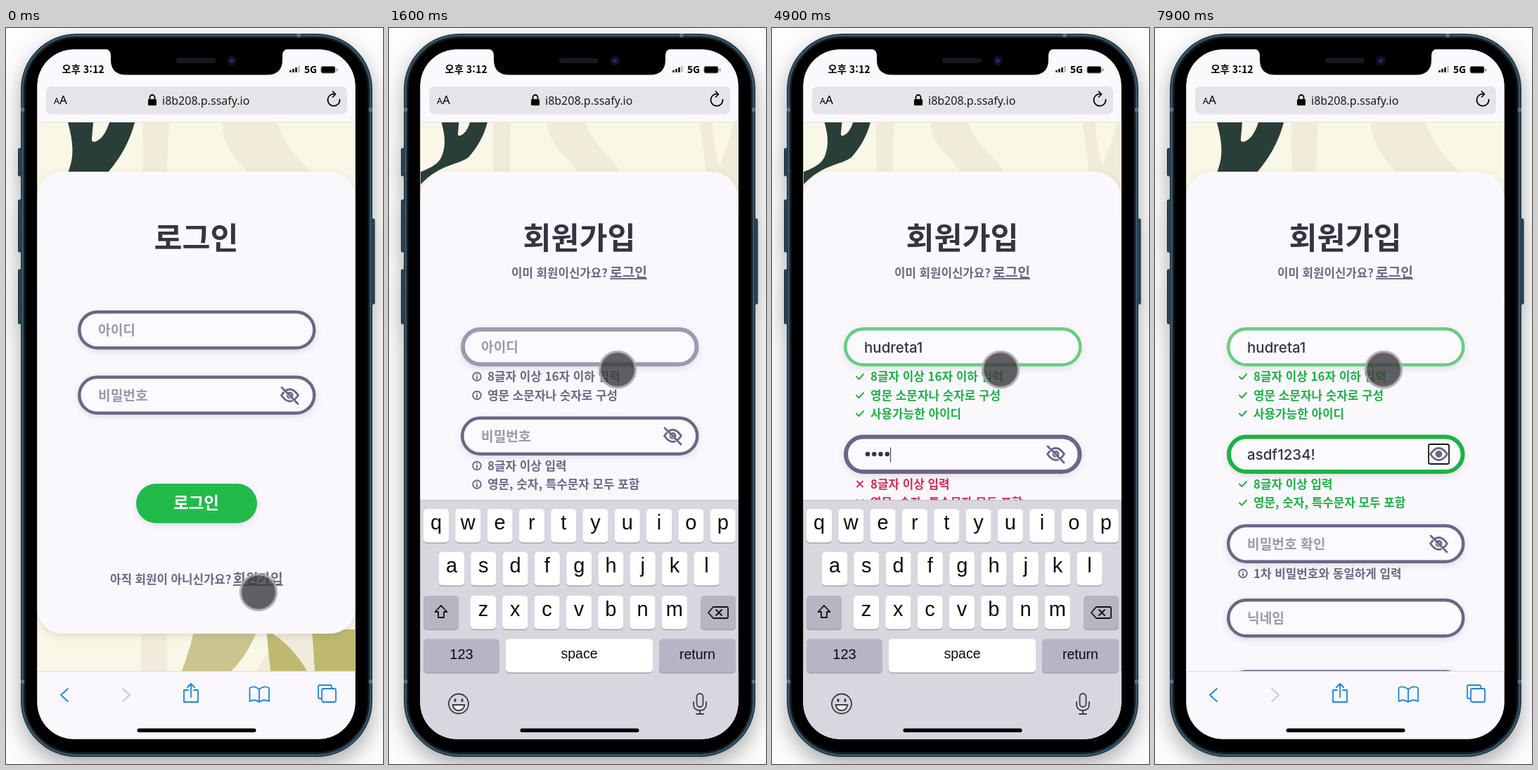
An HTML page for the animation above (8 s loop, 536 by 1045 pixels).

```html
<!DOCTYPE html>
<html lang="ko">
<head>
<meta charset="utf-8">
<style>
html, body { margin: 0; width: 100%; height: 100%; overflow: hidden; background: #fdfdfd; }
svg { display: block; width: 536px; height: 1045px; }
text { font-family: "Noto Sans CJK KR", "Noto Sans CJK", "Noto Sans", sans-serif; white-space: pre; }
.latin { font-family: "Noto Sans", sans-serif; }
.entry { font-family: Inter, "Noto Sans", sans-serif; font-weight: 500; }
.keys text { font-family: "Liberation Sans", Arial, sans-serif; text-anchor: middle; fill: #0b0b0d; }
.line { fill: none; stroke-linecap: round; stroke-linejoin: round; }
.mid { text-anchor: middle; }
</style>
</head>
<body>
<svg viewBox="0 0 536 1045">
  <defs>
    <filter id="phoneShadow" x="-20%" y="-10%" width="140%" height="120%">
      <feDropShadow dx="0" dy="12" stdDeviation="15" flood-color="#000" flood-opacity=".32"/>
    </filter>
    <filter id="soft" x="-20%" y="-30%" width="140%" height="190%">
      <feDropShadow dx="0" dy="3" stdDeviation="5" flood-color="#55506a" flood-opacity=".17"/>
    </filter>
    <clipPath id="screen"><rect x="44.500" y="30.500" width="452" height="979" rx="52"/></clipPath>
    <clipPath id="view"><rect id="viewRect" x="44" y="134" width="453" height="779"/></clipPath>
  </defs>

  <g filter="url(#phoneShadow)">
    <g fill="#2b4353" stroke="#1b2d39">
      <rect x="17.500" y="171" width="8" height="39" rx="1.500"/>
      <rect x="17.500" y="244" width="8" height="74" rx="1.500"/>
      <rect x="17.500" y="343" width="8" height="77" rx="1.500"/>
      <rect x="516" y="271" width="8" height="121" rx="1.500"/>
    </g>
    <rect x="21" y="8" width="500" height="1027" rx="79" fill="#253d4c"/>
  </g>
  <rect x="24" y="11" width="494" height="1021" rx="76" fill="#000" stroke="#3a5669" stroke-width="2.500"/>
  <rect x="26.500" y="13.500" width="489" height="1016" rx="73.500" fill="#000" stroke="#15242e" stroke-width="2"/>
  <path d="M21 116h5M516 116h5M21 928h5M516 928h5M416 8v5" stroke="#5d7484" stroke-width="5"/>

  <g clip-path="url(#screen)">
    <rect x="44" y="30" width="453" height="980" fill="#fbf9fd"/>
    <g clip-path="url(#view)">
      <rect x="44" y="134" width="453" height="780" fill="#f9f7e5"/>
      <g id="scenery">
        <g fill="#f0ebda">
          <path d="M149 0H187Q180 60 184 779H147Q154 300 149 0Z"/>
          <path d="M262 0H340Q350 34 394 76Q440 124 452 250H380Q350 130 305 76Q263 40 262 0Z"/>
          <path d="M576 0H602Q606 60 618 90L640 30L646 0H664V180H596Q588 70 576 0Z"/>
          <path d="M310 779Q340 735 352 700L400 726L450 779Z"/>
        </g>
        <path d="M43 0H138C131 27 118 50 100 71C82 88 42 84 0 128V102C28 91 40 82 45 66C53 44 49 22 43 0Z" fill="#2a3e39"/>
        <path d="M79 0H102Q95 22 83 27Q76 29 77 23Z" fill="#f9f7e5"/>
        <path d="M223 720H313Q296 760 275 779H205Q216 750 223 720Z" fill="#cac58f"/>
        <path d="M325 720Q362 742 383 779H331ZM390 720H453V779H394Z" fill="#bfb970"/>
      </g>
      <g id="form"></g>
    </g>

    <g id="toolbar">
      <rect x="44" width="453" height="440" fill="#faf8fd"/>
      <path d="M44 .5H497" stroke="#dddbe2"/>
      <g class="line" stroke="#1c84e4" stroke-width="1.8">
        <path d="M88 25L78 34L88 43"/>
        <path d="M166 25L176 34L166 43" stroke="#c9c7ce"/>
        <path d="M259 27H253V44H273V27H267M263 37V18M258 23L263 18L268 23"/>
        <path d="M360 26Q353 20 346.500 24V43Q354 39 360 44Q366 39 374 43V24Q367 20 360 26V43"/>
        <path d="M448 39H446Q444 39 444 37V22Q444 20 446 20H461Q463 20 463 22V24"/>
        <rect x="449" y="25" width="20" height="19" rx="2.500"/>
      </g>
    </g>
    <g id="keyboard" class="keys"></g>

    <rect x="44" y="30" width="453" height="104" fill="#fbf9fd"/>
    <path d="M44 133.500H497" stroke="#e6e4e9"/>
    <rect x="57" y="83" width="428" height="39.500" rx="8" fill="#e6e4e8"/>
    <text x="79.500" y="64" font-size="14.300" font-weight="700">오후 3:12</text>
    <text class="latin" x="424" y="64" font-size="14" font-weight="700">5G</text>
    <path d="M404.500 63v-3M408.500 63v-5M412.500 63v-7" stroke="#111" stroke-width="2.600"/>
    <path d="M416.500 63v-9" stroke="#bbb" stroke-width="2.600"/>
    <rect x="448" y="54.500" width="20" height="9.500" rx="2.500" stroke="#777"/>
    <path d="M470.500 57.500v4" stroke="#777" stroke-width="1.500"/>
    <text class="latin" x="68" y="108" font-size="12.500">A<tspan font-size="17">A</tspan></text>
    <rect x="202" y="101" width="12" height="9" rx="1.500"/>
    <path class="line" d="M204.500 101V98.500a3.500 3.500 0 0 1 7 0V101" stroke="#000" stroke-width="1.800"/>
    <text class="latin" x="222" y="108.500" font-size="16" fill="#1c1c1f">i8b208.p.ssafy.io</text>
    <path class="line" d="M474.500 101.500a8.500 8.500 0 1 1 -6 -7.500M464.500 90L468.500 94L464.500 98" stroke="#000" stroke-width="1.700"/>
    <rect x="186.500" y="994.500" width="169" height="5.500" rx="2.750"/>
  </g>

  <path d="M141 29.500Q149 30.500 149 39V45Q149 66.500 171 66.500H371Q393 66.500 393 45V39Q393 30.500 401 29.500Z"/>
  <rect x="242" y="42.500" width="56" height="7.500" rx="3.750" fill="#17181b"/>
  <circle cx="321" cy="46.500" r="7" fill="#0d1122"/>
  <circle cx="321" cy="46.500" r="3" fill="#1d2c66"/>

  <g id="touch">
    <circle r="25" fill="#3a393c" fill-opacity=".8"/>
    <circle r="25.500" fill="none" stroke="#a9a7ab" stroke-opacity=".8" stroke-width="3.500"/>
  </g>
</svg>
<script>
const LOOP = 8000, STEP = 100;
const USER = 'hudreta1', PASS = 'asdf1234!';
const USER_KEYS = [2000, 2250, 2500, 2750, 2900, 3050, 3200, 3400];
const PASS_KEYS = [4350, 4500, 4650, 4800, 5000, 5150, 5300, 5500, 6300];
const T = { signup: 250, move: 350, focusId: 750, open: 768, focusPw: 3700, close: 6800, reveal: 7400 };
const KB_TOP = 670, KB_OUT = 1010, BAR = 97, VIEW_TOP = 134, VIEW_END = 913;
const INK = '#353441', PURPLE = '#6c6686', GREEN = '#1bb244', RED = '#d92b50', HINT = '#9c99a9';

const $ = id => document.getElementById(id);
const clamp = v => Math.max(0, Math.min(1, v));
const easeOut = p => 1 - (1 - clamp(p)) ** 3;
const easeInOut = p => (p = clamp(p)) * p * (3 - 2 * p);
const typed = (keys, t) => keys.filter(k => k <= t).length;
const pen = document.createElement('canvas').getContext('2d');
pen.font = '500 20.5px Inter, "Noto Sans", sans-serif';

const text = (x, y, size, fill, str, extra = 'font-weight="600"') =>
  `<text x="${x}" y="${y}" font-size="${size}" fill="${fill}" ${extra}>${str}</text>`;
const MID = 'class="mid" font-weight="700"';
const LINK = 'font-weight="600" text-decoration="underline"';

function eye(y, open, focus) {
  const box = focus ? `<rect x="389" y="${y - 14}" width="29" height="28" rx="2.5" fill="none" stroke="#17171c" stroke-width="1.8"/>` : '';
  const slash = open ? '' :
    `<path d="M393 -9L415 13" stroke="#fcfafe" stroke-width="3"/><path d="M392 -11L415 12"/>`;
  return `${box}<g class="line" transform="translate(0 ${y})" stroke="${PURPLE}" stroke-width="2.9">
    <path d="M391.500 0Q403.500 -17 415.500 0Q403.500 17 391.500 0Z"/>
    <circle cx="403.500" r="3.500" fill="${open ? PURPLE : 'none'}"/>${slash}</g>`;
}

// Pill-shaped field whose outer top edge is y
function field(y, { color = PURPLE, width = 4.5, hint = '', body = '' }) {
  const i = width / 2;
  return `<rect x="${102 + i}" y="${y + i}" width="${338.5 - width}" height="${55.5 - width}" rx="${27.75 - i}"
    fill="#fcfafe" stroke="${color}" stroke-width="${width}" filter="url(#soft)"/>` +
    (hint && text(131, y + 35, 19.2, HINT, hint)) + body;
}

const MARKS = {
  info: '<circle cx="125" r="5.8"/><path d="M125 0V3M125 -2.800V-2.700"/>',
  ok: '<path d="M120 0L123.500 3.500L130 -3.500"/>',
  bad: '<path d="M121 -4L129 4M129 -4L121 4"/>'
};
function rule(y, state, str) {
  const c = { info: PURPLE, ok: GREEN, bad: RED }[state];
  return `<g class="line" transform="translate(0 ${y})" stroke="${c}" stroke-width="1.9">${MARKS[state]}</g>` +
    text(140, y + 6, 16.9, c, str);
}

const card = (h, r) => `<rect x="44.500" y="204" width="452" height="${h}" rx="${r}" fill="#fbf8fd" filter="url(#soft)"/>`;
const entry = (y, str) => text(131, y + 35.5, 20.5, INK, str, 'class="entry"');
const caret = (x, y) => `<path d="M${x} ${y + 18}V${y + 39}" stroke="#55535f" stroke-width="1.3"/>`;
const blink = (t, since) => (t - since) % 1000 < 500;

function login() {
  return card(656, 36) + text(270.5, 314, 43.5, INK, '로그인', MID) +
    field(401, { hint: '아이디' }) +
    field(493.5, { hint: '비밀번호', body: eye(521.5) }) +
    `<rect x="185" y="647" width="172" height="56" rx="28" fill="#20bb4c" filter="url(#soft)"/>` +
    text(270.5, 683, 23.5, '#fff', '로그인', MID) +
    text(148, 789, 16.8, PURPLE, '아직 회원이 아니신가요?') +
    text(323, 789, 19.2, PURPLE, '회원가입', LINK);
}

function mixGreen(p) {
  const from = [156, 153, 177], to = [102, 205, 130];
  return `rgb(${from.map((v, i) => Math.round(v + (to[i] - v) * p))})`;
}

function signup(t) {
  const n = typed(USER_KEYS, t), m = typed(PASS_KEYS, t);
  const onId = t >= T.focusId && t < T.focusPw, onPw = t >= T.focusPw;
  const left = t >= T.close, shown = t >= T.reveal;
  const pwY = onPw ? 577.5 : 551.5;
  const name = USER.slice(0, n);
  const check = (good, count) => !count ? 'info' : good ? 'ok' : 'bad';

  let idBody = n ? entry(425, name) : '';
  if (onId && blink(t, n ? USER_KEYS[n - 1] : T.focusId))
    idBody += caret(131.5 + pen.measureText(name).width, 425);

  let pwBody = eye(pwY + 27.5, shown, left);
  if (shown) pwBody += entry(pwY, PASS);
  else for (let i = 0; i < m; i++)
    pwBody += `<circle cx="${136 + i * 9.25}" cy="${pwY + 27.5}" r="3.2" fill="${INK}"/>`;
  if (onPw && !left && blink(t, m ? PASS_KEYS[m - 1] : T.focusPw))
    pwBody += caret(131.5 + m * 9.25, pwY);

  return card(900, 38) + text(270.5, 314, 43.5, INK, '회원가입', MID) +
    text(174, 354, 16.8, PURPLE, '이미 회원이신가요?') +
    text(314, 354, 19.2, PURPLE, '로그인', LINK) +
    field(425, {
      color: t < T.focusId ? PURPLE : mixGreen(clamp((t - T.focusPw) / 250)),
      width: onId ? 6 : 4.5, hint: n ? '' : '아이디', body: idBody
    }) +
    rule(495, check(n > 7, n), '8글자 이상 16자 이하 입력') +
    rule(521.5, check(true, n), '영문 소문자나 숫자로 구성') +
    (onPw ? rule(547.5, 'ok', '사용가능한 아이디') : '') +
    field(pwY, {
      color: m > 8 ? GREEN : PURPLE, width: onPw ? 6 : 4.5,
      hint: m ? '' : '비밀번호', body: pwBody
    }) +
    rule(pwY + 70, check(m > 7, m), '8글자 이상 입력') +
    rule(pwY + 96.5, check(m > 8, m), '영문, 숫자, 특수문자 모두 포함') +
    field(pwY + 127, { hint: '비밀번호 확인', body: eye(pwY + 154.5) }) +
    rule(pwY + 197, 'info', '1차 비밀번호와 동일하게 입력') +
    field(pwY + 232.5, { hint: '닉네임' }) +
    field(pwY + 334, {});
}

function key(x, y, w, label, size, base, gray) {
  return `<rect x="${x}" y="${y + 1.5}" width="${w}" height="47.5" rx="5" fill="#a4a1ae"/>
    <rect x="${x}" y="${y}" width="${w}" height="47.5" rx="5" fill="${gray ? '#b7b4c3' : '#fff'}"/>` +
    `<text x="${x + w / 2}" y="${y + base}" font-size="${size}">${label}</text>`;
}

function buildKeyboard() {
  const rows = [['qwertyuiop', 49, 13], ['asdfghjkl', 71, 74], ['zxcvbnm', 116, 136]];
  let s = '<rect x="44" width="453" height="440" fill="#d9d6e0"/><path d="M44 .5H497" stroke="#c3c0cb"/>';
  for (const [letters, x, y] of rows)
    [...letters].forEach((c, i) => s += key(x + i * 45.3, y, 36, c, 29, 28.5, false));
  s += key(49, 136, 50, '', 20, 30, true) + key(443, 136, 50, '', 20, 30, true) +
    key(49, 197.5, 108, '123', 20, 28.5, true) + key(166, 197.5, 209, 'space', 19.5, 27, false) +
    key(384, 197.5, 109, 'return', 19.5, 28, true);
  s += `<g class="line" stroke="#111" stroke-width="1.8">
    <path d="M74 150L82.500 159H78V167H70V159H65.500Z"/>
    <path d="M461 152H480Q482 152 482 154V166Q482 168 480 168H461L454 160ZM465 156L473 164M473 156L465 164"/></g>
    <g class="line" stroke="#3c3b43" stroke-width="1.8">
    <circle cx="99" cy="289.500" r="14"/><path d="M90.500 291H107.500Q106 299 99 299Q92 299 90.500 291Z" fill="#fff"/>
    <path d="M94 283.500V285.500M104 283.500V285.500" stroke-width="3"/>
    <rect x="437.500" y="275" width="9" height="19" rx="4.500"/>
    <path d="M433 287V290Q433 299 442 299Q451 299 451 290V287M442 299V304M437 304H447"/></g>`;
  $('keyboard').innerHTML = s;
}

let last = '';
function render(t) {
  const markup = t < T.signup ? login() : signup(t);
  if (markup !== last) $('form').innerHTML = last = markup;

  const closing = t >= T.close, span = KB_OUT - KB_TOP;
  const kb = closing ? KB_TOP + span * easeOut((t - T.close) / 400)
                     : KB_OUT - span * easeOut((t - T.open) / 400);
  const bar = closing ? kb - BAR * clamp((kb - KB_TOP) / 100) : VIEW_END;
  const h = Math.min(kb, bar) - VIEW_TOP;
  $('keyboard').setAttribute('transform', `translate(0 ${Math.round(kb)})`);
  $('toolbar').setAttribute('transform', `translate(0 ${Math.round(bar)})`);
  $('viewRect').setAttribute('height', h);
  $('scenery').setAttribute('transform', `translate(45 ${VIEW_TOP}) scale(${h / (VIEW_END - VIEW_TOP)})`);

  const p = easeInOut((t - T.move) / 350);
  $('touch').setAttribute('transform', `translate(${359 - 34 * p} ${801 - 316 * p})`);
}

buildKeyboard();
const start = performance.now();
// The picture advances ten times a second; a small lead absorbs timer rounding
function tick() {
  const t = (performance.now() - start + 8) % LOOP;
  render(Math.floor(t / STEP) * STEP);
  requestAnimationFrame(tick);
}
tick();
</script>
</body>
</html>
```
